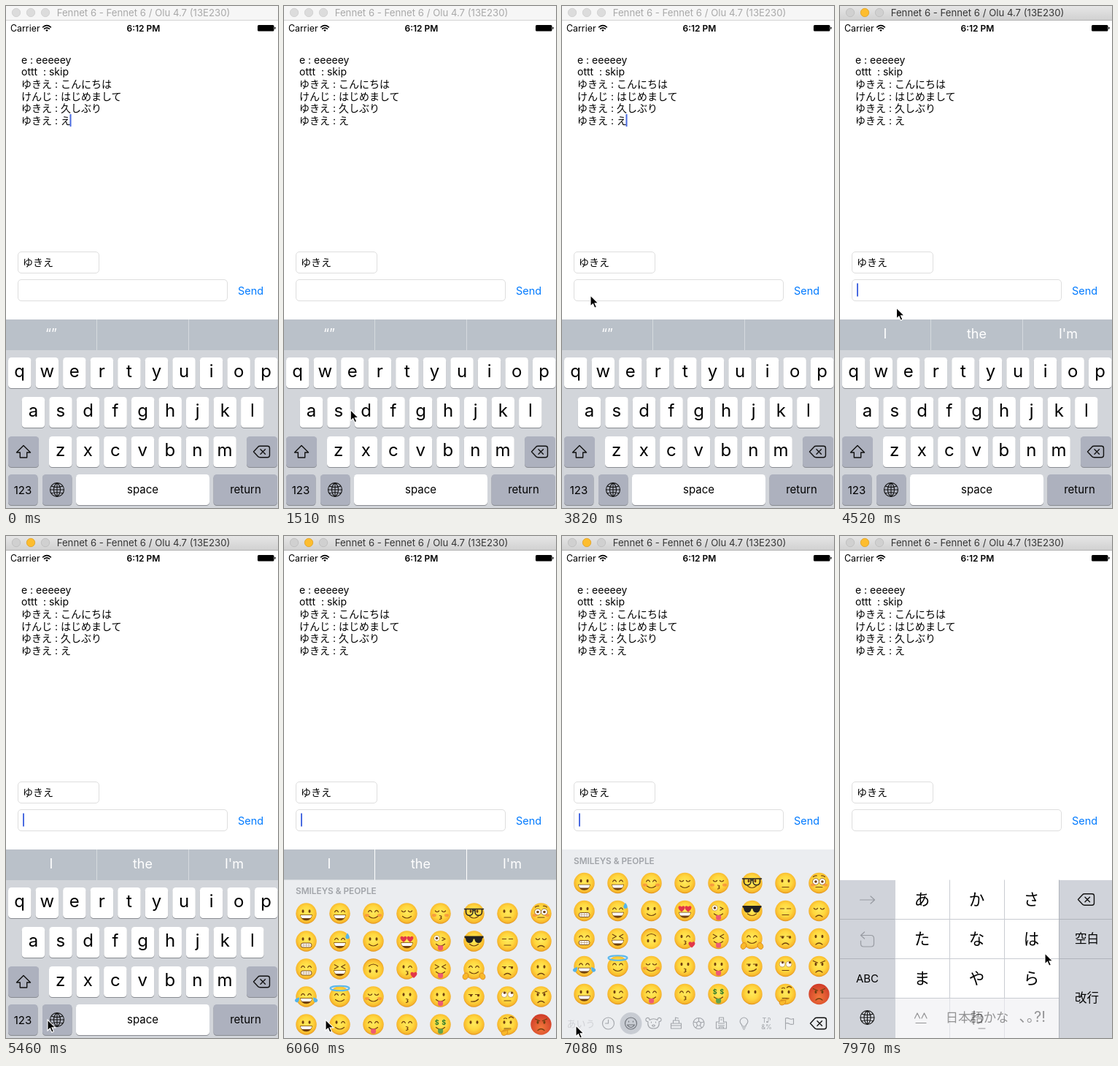
Write an HTML page that moves like this. It is 373 px wide and 687 px high and loops after 8000 ms.

```html
<!DOCTYPE html>
<html lang="ja">
<head>
<meta charset="utf-8">
<style>
html, body { margin: 0; width: 100%; height: 100%; overflow: hidden; background: #fff }
svg { display: block; width: 373px; height: 687px; font-family: Inter, 'Noto Sans CJK JP', 'Noto Sans CJK', sans-serif }
text { white-space: pre }
</style>
</head>
<body>
<svg id="stage" viewBox="0 0 373 687"></svg>
<script>
const rect = (x, y, w, h, fill, r = 0, more = '') =>
  `<rect x="${x}" y="${y}" width="${w}" height="${h}" rx="${r}" fill="${fill}" ${more}/>`;
const text = (x, y, s, size, fill = '#000', more = '') =>
  `<text x="${x}" y="${y}" font-size="${size}" fill="${fill}" ${more}>${s}</text>`;
const mid = (x, y, s, size, fill, more = '') => text(x, y, s, size, fill, 'text-anchor="middle" ' + more);
const oval = (x, y, rx, ry, fill, more = '') =>
  `<ellipse cx="${x}" cy="${y}" rx="${rx}" ry="${ry}" fill="${fill}" ${more}/>`;
const path = (d, fill, more = '') => `<path d="${d}" fill="${fill}" ${more}/>`;
const line = (d, color, w = 1) => path(d, 'none', `stroke="${color}" stroke-width="${w}" stroke-linecap="round" stroke-linejoin="round"`);
const at = (x, y, s, more = '') => `<g transform="translate(${x} ${y}) ${more}">${s}</g>`;
const group = (id, s) => `<g id="${id}">${s}</g>`;

// Icons, centred on 0,0
const globe = line('M-9.5 0a9.5 9.5 0 1 0 19 0a9.5 9.5 0 1 0 -19 0H9.5M0-9.5V9.5M0-9.5C-6-5-6 5 0 9.5C6 5 6-5 0-9.5M-8-5Q0-2 8-5M-8 5Q0 2 8 5', '#111', 1.1);
const erase = line('M-11 0L-5-6.5Q-4-7.7-2-7.7H8Q11-7.7 11-5V5Q11 7.7 8 7.7H-2Q-4 7.7-5 6.5ZM-1.5-3.3L5 3.3M5-3.3L-1.5 3.3', '#111', 1.4);
const shift = line('M-9.5 1L0-8.5L9.5 1H4.7V8H-4.7V1Z', '#111', 1.4);

// Window, status bar and chat
function chat() {
  const title = 'Fennet 6 - Fennet 6 / Olu 4.7 (13E230)';
  const bar = (fill, ink, edge, lights, rim) => rect(0, 0, 373, 20, fill) + rect(0, 19, 373, 1, edge) +
    lights.map((c, i) => oval(14 + 20 * i, 9, 5.7, 5.7, c, `stroke="${rim[i]}" stroke-width=".8"`)).join('') +
    mid(188.5, 14, title, 13.2, ink);
  const grey = '#dcdcdc', rim = '#cdcdcd';
  const lines = ['e : eeeeey', 'ottt  : skip', 'ゆきえ : こんにちは', 'けんじ : はじめまして', 'ゆきえ : 久しぶり', 'ゆきえ : え'];
  const wifi = path('M56 35L54.2 33Q56 31.6 57.8 33Z', '#000') +
    line('M52.6 31.2Q56 28.4 59.4 31.2M50.7 28.9Q56 24.4 61.3 28.9', '#000', 1.6);
  const box = (y, w) => rect(16.5, y, w, 29, '#fff', 4.5, 'stroke="#dedede"');
  return rect(0, 0, 373, 687, '#fff') +
    group('idle', bar('#f6f6f6', '#a9a9a9', '#d4d4d4', [grey, grey, grey], [rim, rim, rim])) +
    group('active', bar('url(#chrome)', '#363636', '#b4b4b4', ['#d0d0d0', '#fdbd2f', '#d0d0d0'], ['#bbb', '#dfa023', '#bbb'])) +
    text(6, 34.5, 'Carrier', 12.4) + wifi +
    mid(188.5, 34.5, '6:12 PM', 12, '#000', 'font-weight="600"') +
    rect(345, 26, 22.5, 8.5, '#000', 1.5) + rect(368.2, 28.7, 1.3, 3, '#000', .6) +
    lines.map((s, i) => text(21, 78.7 + 16.6 * i, s, 14)).join('') +
    box(336.5, 111) + text(23, 356, 'ゆきえ', 14) + box(374.5, 287) + text(318, 395, 'Send', 14.5, '#007aff') +
    rect(87.5, 148, 2, 17, '#4a6be0', 0, 'id="caret1"') + rect(23, 379.5, 2, 18, '#4a6be0', 0, 'id="caret2"');
}

function letters() {
  const key = (x, y, w, fill, s) => rect(x, y + 1, w, 42, '#898c92', 4.5) + rect(x, y, w, 42, fill, 4.5) + s;
  const dark = '#adb1be', white = '#fff';
  const row = (s, x, y) => [...s].map((c, i) =>
    key(x + 37.55 * i, y, 31.5, white, mid(x + 37.55 * i + 15.7, y + 27, c, 24))).join('');
  return rect(0, 471, 373, 216, '#d2d5da') +
    row('qwertyuiop', 3, 481) + row('asdfghjkl', 21.7, 535) + row('zxcvbnm', 59, 589) +
    key(3, 589, 42, dark, at(24, 610, shift)) + key(330, 589, 42, dark, at(350.5, 610, erase)) +
    key(3, 641, 40.5, dark, mid(23, 668, '123', 15)) + key(50, 641, 40.5, dark, at(70, 662, globe)) +
    key(96, 641, 183, white, mid(187.5, 667, 'space', 15)) + key(284.5, 641, 87.5, dark, mid(328.5, 667, 'return', 15));
}

// Emoji faces: first letter is the eyes, second the mouth, the rest are extras
const ink = '#70400f', red = '#e2374a';
const pair = s => at(-4.5, -3, s) + at(4.5, -3, s, 'scale(-1 1)');
const heart = path('M0 4.5C-8-1-3.5-6 0-2.5C3.5-6 8-1 0 4.5Z', red);
const dot = oval(0, 0, 1.5, 2.3, ink), hat = line('M-2.4 1Q0-3.2 2.4 1', ink, 1.2);
const cup = line('M-2.6-.5Q0 2.5 2.6-.5', ink, 1.2), dash = line('M-2.6 0H2.6', ink, 1.2);
const ball = oval(0, 0, 4, 4, '#fff', 'stroke="#b98730" stroke-width=".7"');
const tear = path('M0-4C4 1 3 4 0 4C-3 4-4 1 0-4Z', '#54b4ea');
const smile = line('M-6 4Q0 9 6 4', ink, 1.2);
const grin = path('M-8.5 1.8H8.5Q7 9.8 0 9.8Q-7 9.8-8.5 1.8Z', ink) + path('M-7.7 2.4H7.7Q7 6.5 5 6.5H-5Q-7 6.5-7.7 2.4Z', '#fff');
const tongue = fill => smile + path('M-3.4 6H3.6V9.5Q3.6 12.8.1 12.8Q-3.4 12.8-3.4 9.5Z', fill);
const eyes = {
  o: pair(dot), n: pair(hat), u: pair(cup), '-': pair(dash), h: pair(heart),
  x: pair(line('M-2.7-2.7L2.4 0L-2.7 2.7', ink, 1.3)),
  w: at(-4.5, -3, dot) + at(4.5, -3, hat),
  z: at(-5, -4, ball + oval(0, 0, 1.8, 1.8, ink)) + at(5, -3, line('M-2.5-2L1.5 0L-2.5 2', ink, 1.3)),
  g: pair(dot) + line('M-11-6H-1.5V-2A4.7 4.7 0 0 1-11-2ZM1.5-6H11V-2A4.7 4.7 0 0 1 1.5-2ZM-1.5-4H1.5M-13-6H13', '#222', 1.5),
  G: path('M-13-7H13V-5L11.5-3.8Q10.5 2.5 5.8 2.5Q1.5 2 .8-3H-.8Q-1.5 2-5.8 2.5Q-10.5 2.5-11.5-3.8L-13-5Z', '#222'),
  l: pair(dash) + oval(-4, -1.7, 1.6, 1.7, ink) + oval(6, -1.7, 1.6, 1.7, ink),
  r: pair(ball) + oval(-4, -5.3, 1.6, 1.6, ink) + oval(6, -5.3, 1.6, 1.6, ink),
  O: at(0, 1, pair(oval(0, 0, 4.4, 4.4, '#fff', 'stroke="#8a5a1c" stroke-width=".8"') + oval(0, 0, 1.8, 1.8, ink))) +
    line('M-8-8.5Q-6-10.5-3-10M8-8.5Q6-10.5 3-10', ink, 1.1),
  $: mid(-4.8, 0, '$', 9, '#2b7a2c', 'font-weight="700"') + mid(4.8, 0, '$', 9, '#2b7a2c', 'font-weight="700"')
};
const mouths = {
  D: grin, s: smile, P: tongue('#ee5b72'), M: tongue('#62a24a'), _: '',
  T: rect(-7.5, 2.5, 15, 6, '#fff', 3, `stroke="${ink}" stroke-width=".9"`) + line('M-7 5.5H7M-3.5 3V8M0 3V8M3.5 3V8', '#b99b78', .7),
  k: line('M-1 3Q3.2 3.5.3 5.5Q3.2 7-1 8', ink, 1.2),
  '-': line('M-4.5 5.5H4.5', ink, 1.2), f: line('M-4.5 8Q0 4 4.5 8', ink, 1.2), m: line('M-4 6.5Q2 7.5 6 3.5', ink, 1.2)
};
const blush = oval(-8.5, 2.5, 3, 2, '#f5793f', 'opacity=".6"') + oval(8.5, 2.5, 3, 2, '#f5793f', 'opacity=".6"');
const hand = oval(0, 0, 3.6, 4.6, '#f9b92b', 'stroke="#d8861c" stroke-width=".8"');
const extras = {
  b: blush, d: at(10.5, -7, tear), j: at(-12, 4, tear, 'rotate(40)') + at(12, 4, tear, 'rotate(-40)'),
  a: oval(0, -11.5, 13, 3.2, 'none', 'stroke="#5bb8ec" stroke-width="2"'), q: at(9.5, 8, heart),
  H: at(-11.5, 10, hand, 'rotate(30)') + at(11.5, 10, hand, 'rotate(-30)'),
  t: line('M-5-8Q-3-9.5-1-8M2-9Q5-12 8-9', ink, 1.2) + at(-4, 11, hand, 'rotate(55)') + line('M-6 9L4 6.5', '#e09b20', 2),
  A: line('M-8-7.5L-2-5M8-7.5L2-5', ink, 1.3)
};
const faces = ('oD oT nT nDj oD nD nDd xD nsa ws nsb os osv usb nP us hD wkq ok nk ' +
  'ukb zP xP oP $M gs Gs nsH lm o_ o- -- lf r- o-t O-b uf of ofA ofAR').split(' ');
const face = (f, i) => at(30.5 + 46 * Math.floor(i / 5), 475 + 38 * (i % 5),
  oval(0, 0, 14.2, 14.2, f.includes('R') ? 'url(#rage)' : 'url(#skin)') +
  eyes[f[0]] + mouths[f[1]] + [...f.slice(2)].map(c => extras[c] || '').join(''),
  f.includes('v') ? 'rotate(180)' : '');

function emoji() {
  const g = '#a2a5aa';
  const icons = [
    'M-8 0a8 8 0 1 0 16 0a8 8 0 1 0-16 0M0-5V0H-4',
    '',
    'M-5.5-4.5A2.6 2.6 0 1 0-7.5-2.5Q-9 7 0 7Q9 7 7.5-2.5A2.6 2.6 0 1 0 5.5-4.5Q0-8-5.5-4.5M-3-2V-1M3-2V-1M-2 3Q0 1 2 3Q0 6-2 3',
    'M-7 7V0H7V7ZM-7 3H7M-4 0V-4H4V0M-1-4V-8L3-7',
    'M-7.5 0a7.5 7.5 0 1 0 15 0a7.5 7.5 0 1 0-15 0M0-3L3-1L2 3H-2L-3-1ZM0-3V-7M3-1L7-2M2 3L4 6M-2 3L-4 6M-3-1L-7-2',
    'M-7 7V-2H-3V-8H3V-2H7V7ZM-4 3H4M-1-5H1M-4 0H4M-3 7V5H3V7',
    'M-2.5 4Q-2.5 2-4.5 0A5.2 5.2 0 1 1 4.5 0Q2.5 2 2.5 4ZM-2 6H2M-1 8H1',
    '',
    'M-5 8V-7Q-2-8 0-6.5Q3-5 6-6.5V1Q3 2 0 .5Q-2-1-5 0'
  ];
  const icon = (d, i) => at(63.5 + 31 * i, 667, d ? line(d, g, 1.1) : '');
  return rect(0, 429, 373, 300, '#ebedf0') +
    text(16, 448.5, 'SMILEYS &amp; PEOPLE', 11.8, '#a1a4a9', 'font-weight="600"') +
    faces.map(face).join('') + icons.map(icon).join('') +
    text(6.5, 672, 'あいう', 13, '#8f9298', 'id="kanaKey"') +
    oval(94.5, 667, 15, 15, '#c8ccd3') +
    at(94.5, 667, line('M-8 0a8 8 0 1 0 16 0a8 8 0 1 0-16 0M-5 2Q0 9 5 2ZM-3-3V-2M3-3V-2', '#70747b', 1.2)) +
    mid(280.5, 666, 'T♪', 9, g) + mid(280.5, 675, '&amp;%', 9, g) + at(351.5, 667, erase);
}

function kana() {
  const side = '#d0d3da', sep = '#c9ccd2', edge = '#b0b4bc';
  const keys = [...'あかさたなはまやら'].map((c, i) =>
    mid(112.5 + 75 * (i % 3), 504.5 + 54 * Math.floor(i / 3), c, 21.5)).join('');
  return rect(0, 429, 373, 258, '#fff') + rect(0, 471, 76, 216, side) + rect(300, 471, 73, 216, side) +
    line('M76 524.5H300M76 578.5H300M76 632.5H300M150.5 471V687M225.5 471V687', sep) +
    line('M0 524.5H75M0 578.5H75M0 632.5H75M300.5 524.5H373M300.5 578.5H373M300.5 471V687', edge) +
    keys + at(37.5, 498, line('M-10 0H10M4.5-5L10 0L4.5 5', '#989ba2', 1.2)) +
    at(37.5, 552, line('M-4-10L-9-5.5L-4-1M-9-5.5H5Q9-5.5 9-1V6Q9 10 5 10H-5Q-9 10-9 6V2', '#989ba2', 1.2)) +
    mid(37.5, 611, 'ABC', 15) + at(37.5, 659, globe) + at(337.5, 497.5, erase) +
    mid(338.5, 557, '空白', 16.5) + mid(338.5, 638, '改行', 16.5) +
    line('M102.5 660L106 653L109.5 660M112 660L115.5 653L119 660M104 666.5H118', '#000', 1.2) +
    mid(187.5, 666.5, 'わ', 21.5) + line('M190 674H199', '#000') + mid(264, 665, '､｡?!', 20) +
    group('hint', rect(76, 633, 224, 54, '#f0f0f3', 0, 'opacity=".94"')) +
    mid(188, 665, '日本語かな', 17.3, '#000', 'id="hintText"');
}

const words = list => list.map((s, i) => mid(62 + 125.5 * i, 455, s, 18, '#fff')).join('');
const $ = id => document.getElementById(id);
$('stage').innerHTML = `<defs>
  <linearGradient id="chrome" x2="0" y2="1"><stop stop-color="#e6e6e6"/><stop offset="1" stop-color="#d0d0d0"/></linearGradient>
  <radialGradient id="skin" cy=".45" r=".56"><stop stop-color="#ffe95c"/><stop offset=".55" stop-color="#ffd73e"/><stop offset=".85" stop-color="#f8b92e"/><stop offset="1" stop-color="#dc8c1a"/></radialGradient>
  <radialGradient id="rage" cy=".65" r=".65"><stop stop-color="#f2793c"/><stop offset="1" stop-color="#cf3a28"/></radialGradient></defs>` +
  chat() + rect(0, 429, 373, 42, '#bac1c9') +
  group('dividers', line('M124.5 429V471M250.5 429V471', '#fff')) +
  group('quotes', words(['“”'])) + group('words', words(['I', 'the', "I'm"])) +
  group('letters', letters()) + group('emoji', emoji()) + group('kana', kana()) +
  group('pointer', path('M0 0V15L3.4 11.8L5.8 17.2L8.4 16L6 10.9H10.8Z', '#000', 'stroke="#fff" stroke-width="1.1"'));

// Pointer path: time, x, y
const route = [[1040, 160, 690], [1350, 112, 600], [1620, 77, 520], [1830, 98, 480], [2100, 106, 525], [2530, 58, 653],
  [2600, 58, 653], [2660, 59, 638], [3000, 102, 520], [3300, 82, 430], [3470, 62, 393], [3800, 39, 396], [4340, 39, 396],
  [4700, 116, 430], [4860, 116, 430], [5050, 56, 650], [5270, 56, 650], [5350, 55, 668], [5460, 57, 662], [6400, 57, 662],
  [6540, 66, 664], [6780, 19, 670], [7440, 19, 670], [7960, 281, 571], [8000, 281, 571]];
const ramp = (t, a, b) => Math.max(0, Math.min(1, (t - a) / (b - a)));
const show = (id, on) => $(id).setAttribute('opacity', +on);

function draw(t) {
  const blink = t % 930, active = t >= 4340;
  show('idle', !active);
  show('active', active);
  show('caret1', active ? 0 : 1 - ramp(blink, 240, 390) + ramp(blink, 660, 810));
  show('caret2', t < 4400 ? 0 : t < 7080
    ? 1 - ramp(t, 4850, 5050) + ramp(t, 5260, 5460) - ramp(t, 6620, 6780)
    : 1 - ramp(t, 7500, 7640));
  show('quotes', t < 4460);
  show('words', t >= 4460);
  show('dividers', t < 5940 ? .4 : 1);
  show('letters', t < 5940);
  show('emoji', t >= 5940 && t < 7380);
  $('emoji').setAttribute('transform', `translate(0 ${41.5 * (1 - ramp(t, 6110, 6180))})`);
  $('kanaKey').setAttribute('fill', t < 7080 ? '#8f9298' : '#d0d2d6');
  show('kana', t >= 7380);
  const fade = ramp(t, 7850, 8200);
  show('hint', 1 - fade);
  show('hintText', .6 * (1 - fade));
  const i = Math.max(1, route.findIndex(p => p[0] >= t));
  const [a, b] = [route[i - 1], route[i]], k = ramp(t, a[0], b[0]);
  $('pointer').setAttribute('transform', `translate(${a[1] + (b[1] - a[1]) * k} ${a[2] + (b[2] - a[2]) * k})`);
}

let start;
function tick(now) {
  start ??= now;
  draw((now - start) % 8000);
  requestAnimationFrame(tick);
}
draw(0);
requestAnimationFrame(tick);
</script>
</body>
</html>
```
